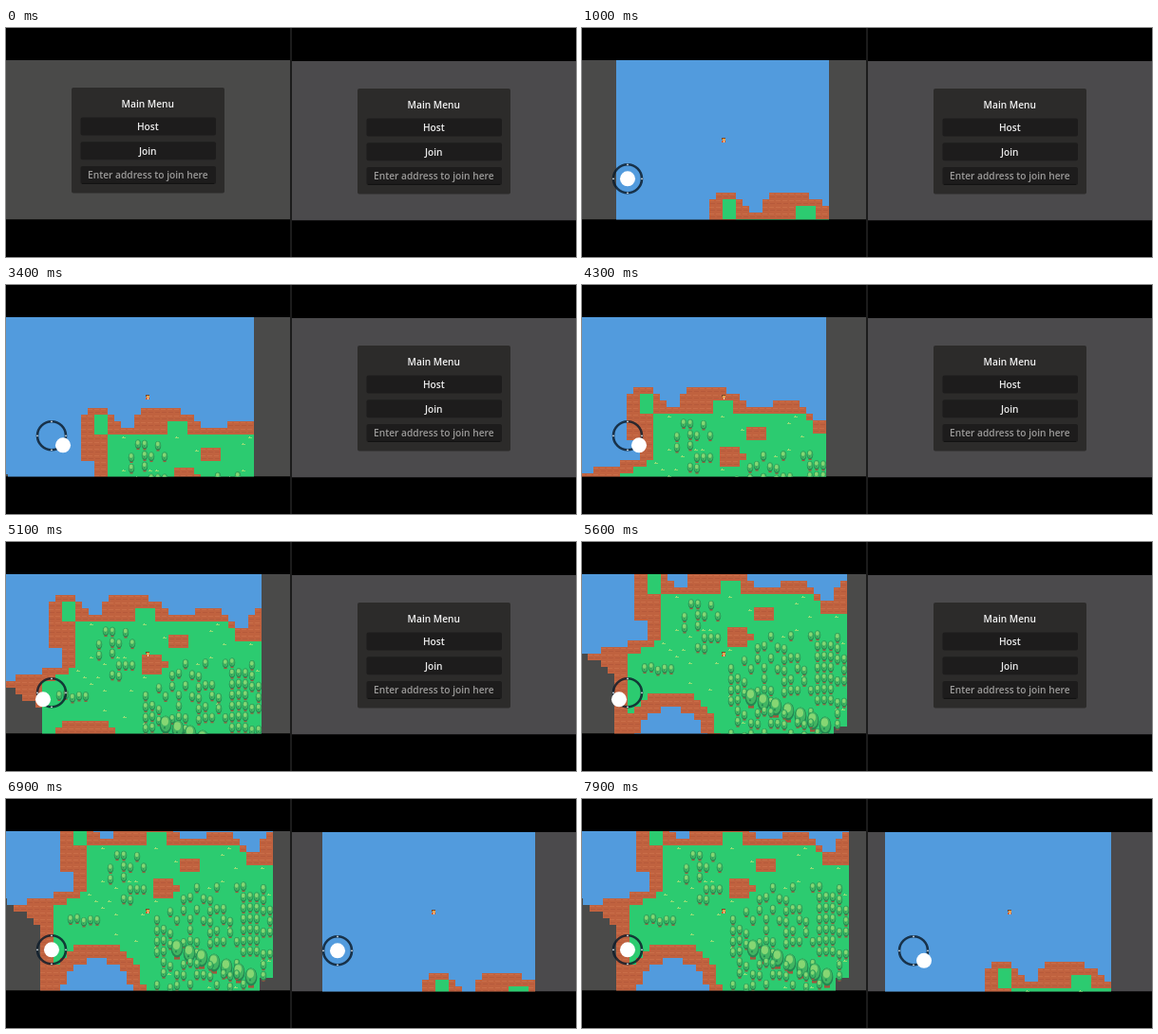
These frames come from a looping animation (600 px wide and 242 px high, 8000 ms). An HTML page with a canvas:

```html
<!DOCTYPE html>
<html lang="en">
<head>
<meta charset="utf-8">
<title>Two players on one island</title>
<style>
html, body { margin: 0; width: 100%; height: 100%; overflow: hidden; background: #000; }
canvas { display: block; }
</style>
</head>
<body>
<canvas id="stage" width="600" height="242"></canvas>
<script>
const ctx = document.getElementById('stage').getContext('2d');
const LOOP = 8000, STEP = 100, TILE = 7, REACH = 16;
const PLAYER = { x: 150, y: 118 };
const VIEW = { y: 34, w: 299, h: 168.5 };
const WATER = '#529bdd', BRICK = '#c0623f', GRASS = '#2ccb70';

// Linear interpolation through [input, ...values] points.
function along(points, t) {
  const next = points.findIndex(p => p[0] > t);
  if (next === 0) return points[0].slice(1);
  if (next < 0) return points[points.length - 1].slice(1);
  const a = points[next - 1], b = points[next], k = (t - a[0]) / (b[0] - a[0]);
  return a.slice(1).map((v, i) => v + (b[i + 1] - v) * k);
}
const level = (points, t) => Math.floor(along(points, t)[0] + 0.4);

// Repeatable noise from 0 to 1 for a pair of integers.
function noise(a, b) {
  const v = Math.sin(a * 127.1 + b * 311.7) * 43758.5453;
  return v - Math.floor(v);
}
const radial = (x, y, cx, cy, rx, ry = rx) => Math.hypot((x - cx) / rx, (y - cy) / ry);

// Island outline in tiles: north coast by column, west coast by row.
const north = [[8, 4], [9, 3], [11, 3], [14, 6], [15, 6], [17, 3], [22, 3], [26, 6], [29, 6], [30, 5], [33, 5], [36, 8], [37, 8], [39, 5]];
const cliff = [[11, 14], [12, 7], [34, 7], [36, 10]];
const west = [[10, 8], [11, 10], [13, 10], [14, 7], [15, 3], [17, 0]];
const beach = [[14, 11], [16, 7]];

function terrain(c, r) {
  const top = level(north, c);
  if (r < top || c < level(west, r)) return WATER;
  if (radial(c, r, 13, 30, 5.6, 6.4) < 1) return WATER;
  if (radial(c, r, 10.5, 5, 1.2) < 1 || radial(c, r, 22, 5.5, 1.2) < 1) return GRASS;
  const rock = r < Math.max(top + 1, level(cliff, c))
    || (r >= 14 && c < level(beach, r))
    || radial(c, r, 13, 30, 7.4, 8.9) < 1
    || radial(c, r, 23.2, 13, 1.85) < 1
    || radial(c, r, 27, 9.5, 1.2) < 1;
  return rock ? BRICK : GRASS;
}

const colOf = x => Math.floor((x - 1) / TILE), rowOf = y => Math.floor(y / TILE);

function woodDensity(x, y) {
  if (radial(x, y, 128, 79, 22, 28) < 1) return 0.6;
  if (radial(x, y, 82, 127, 19, 11) < 1) return 0.9;
  return x > 152 && y > Math.max(86, 126 - (x - 155) * 0.75) ? 0.58 : 0;
}

const trees = [];
for (let c = 8; c < 40; c++)
  for (let i = 0; i < 13; i++) {
    const x = c * TILE + 5, y = 57 + i * 11.5 + 5 * noise(c, 0);
    if (noise(c, i + 1) < woodDensity(x, y) && terrain(colOf(x), rowOf(y)) === GRASS)
      trees.push({ x, y, size: 1 });
  }
for (let i = 0; i < 8; i++) trees.push({ x: 180 + i * 13, y: 158 + i * 5, size: 2 });
trees.sort((a, b) => a.y - b.y);

// Points: time, x, y.
const panes = [
  {
    x: 0, y: 0, start: 500, gray: '#4a4a49',
    camera: [[1300, 76.5, 153], [2500, 53, 130], [4300, -10, 87], [4800, -24, 42], [5100, -12, 35], [5700, 0, 0]],
    stick: [[1100, 0, 0], [1300, 12, 10], [4600, 12, 10], [4900, -9, 7], [5600, -9, 7], [5700, 0, 0]]
  },
  {
    x: 301, y: 1, start: 6700, gray: '#4b4a4c',
    camera: [[7400, 80, 162], [7900, 66, 150]],
    stick: [[7300, 0, 0], [7500, 11, 10.5]]
  }
];

// Tiles load around the player and stay; remember when each first appears.
const key = (c, r) => c + ',' + r;
for (const pane of panes) {
  pane.tiles = new Map();
  for (let t = pane.start; t < LOOP; t += STEP) {
    const [ox, oy] = along(pane.camera, t);
    const pc = colOf(PLAYER.x - ox), pr = rowOf(PLAYER.y - oy);
    for (let c = pc - REACH; c < pc + REACH; c++)
      for (let r = pr - REACH; r < pr + REACH; r++)
        if (!pane.tiles.has(key(c, r)))
          pane.tiles.set(key(c, r), { c, r, since: t, color: terrain(c, r) });
  }
}

function box(color, x, y, w, h) {
  ctx.fillStyle = color;
  ctx.fillRect(x, y, w, h);
}

function disc(color, x, y, rx, ry = rx) {
  ctx.fillStyle = color;
  ctx.beginPath();
  ctx.ellipse(x, y, rx, ry, 0, 0, Math.PI * 2);
  ctx.fill();
}

function rounded(color, x, y, w, h) {
  ctx.fillStyle = color;
  ctx.beginPath();
  ctx.roundRect(x, y, w, h, 2);
  ctx.fill();
}

function drawTile({ c, r, color }, x, y) {
  box(color, x, y, TILE, TILE);
  if (color === BRICK) {
    box('#c96d48', x, y + 1, 5, 1);
    box('#b65a3b', x + 1, y + 4, 5, 1);
  } else if (color === GRASS && noise(c, -r) < 0.09) {
    box('#8fdc70', x + 1, y + 3, 4, 1);
    box('#a9df86', x + 2, y + 2, 1, 1);
  }
}

function drawTree(x, y, s) {
  box('#a4553c', x - 1.5 * s, y + 3.5 * s, 3 * s, 2.3 * s);
  disc('#238751', x, y, 3.2 * s, 4.8 * s);
  disc('#41b562', x, y - 0.5 * s, 2.7 * s, 4.1 * s);
  disc('#86d673', x - 0.3 * s, y - 1.7 * s, 1.8 * s, 2.2 * s);
  box('#238751', x - s, y + 1.2 * s, 0.9 * s, 0.9 * s);
}

function drawPlayer() {
  const x = PLAYER.x - 1, y = PLAYER.y;
  box('#7a4a2a', x - 2, y - 2, 4, 2);
  box('#eda34a', x - 1, y - 1, 3, 2);
  box('#d0652f', x - 2, y + 1, 4, 2);
  box('#f0dcc0', x, y + 1, 1, 2);
}

function drawStick([dx, dy]) {
  const x = 48, y = 159.3, radius = 15;
  ctx.strokeStyle = 'rgba(12,28,42,.82)';
  ctx.lineWidth = 2.6;
  ctx.beginPath();
  ctx.arc(x, y, radius, 0, Math.PI * 2);
  ctx.stroke();
  for (let a = 0; a < 4; a++)
    disc('#dfe8ee', x + radius * Math.cos(a * Math.PI / 2), y + radius * Math.sin(a * Math.PI / 2), 0.9);
  disc('#fff', x + dx, y + dy, 8);
}

function label(text, y, color) {
  ctx.fillStyle = color;
  ctx.fillText(text, 149.3, y);
}

function drawMenu(hover) {
  rounded('#2c2b2a', 69, 63, 161, 111.5);
  ctx.font = '600 10.2px "Open Sans", "Noto Sans", sans-serif';
  ctx.textAlign = 'center';
  label('Main Menu', 83.5, '#f2f2f2');
  ['Host', 'Join', 'Enter address to join here'].forEach((text, i) => {
    const y = 94.5 + i * 25.7, field = i === 2;
    rounded(hover && i === 0 ? '#252424' : '#1d1c1c', 78.5, y, 142.5, 19);
    if (field) box('#111', 80, y + 18, 139, 1);
    label(text, y + 13.3, field ? '#9b9a99' : '#ececec');
  });
}

function drawGame(pane, t) {
  const [ox, oy] = along(pane.camera, t).map(Math.round);
  for (const tile of pane.tiles.values())
    if (tile.since <= t) drawTile(tile, 1 + tile.c * TILE + ox, tile.r * TILE + oy);
  for (const { x, y, size } of trees) {
    const tile = pane.tiles.get(key(colOf(x), rowOf(y)));
    if (tile && tile.since <= t) drawTree(x + ox, y + oy, size);
  }
  drawPlayer();
  drawStick(along(pane.stick, t));
}

function draw(t) {
  box('#000', 0, 0, 600, 242);
  panes.forEach((pane, i) => {
    ctx.save();
    ctx.translate(pane.x, pane.y);
    ctx.beginPath();
    ctx.rect(0, VIEW.y, VIEW.w, VIEW.h);
    ctx.clip();
    box(pane.gray, 0, VIEW.y, VIEW.w, VIEW.h);
    if (t >= pane.start) drawGame(pane, t);
    else drawMenu(i === 0 && t >= 200);
    ctx.restore();
  });
  box('#1c1c1c', 299, 0, 2, 242);
}

const began = performance.now();
let shown = -1;
function frame() {
  const t = Math.floor(((performance.now() - began) % LOOP) / STEP) * STEP;
  if (t !== shown) draw(shown = t);
  requestAnimationFrame(frame);
}
frame();
</script>
</body>
</html>
```
